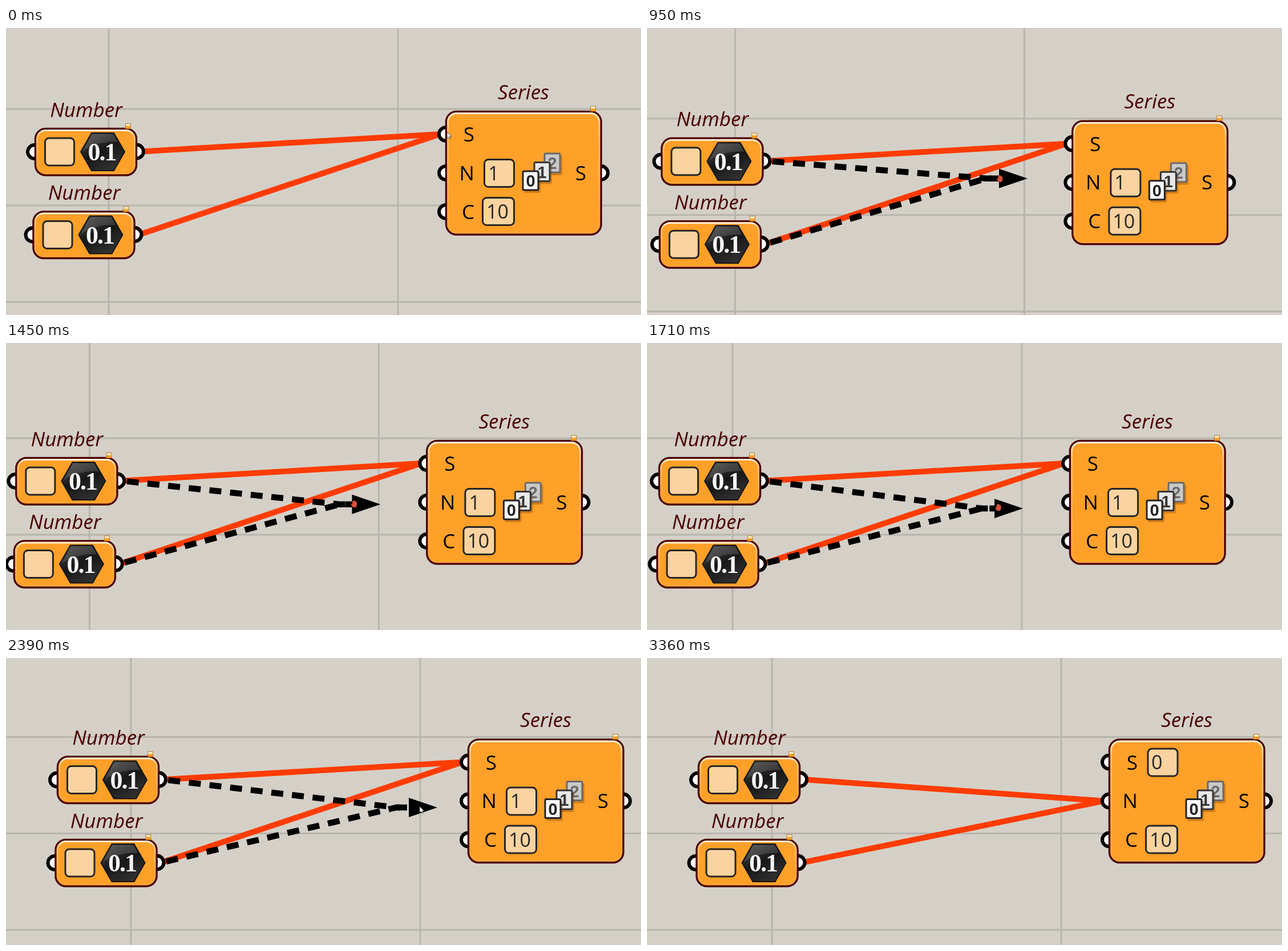
These frames come from a looping animation (1113 by 503 pixels, 4.23 s). An HTML page:

```html
<!DOCTYPE html>
<html lang="en">
<head>
<meta charset="utf-8">
<title>Moving wires between inputs</title>
<style>
  html, body { margin: 0; width: 100%; height: 100%; overflow: hidden; background: #d4d0c8; }
  svg { display: block; width: 1113px; height: 503px; }
  text { font-family: "Open Sans", "Noto Sans", sans-serif; font-size: 35px; }
  .title { font-style: italic; fill: #4b0000; text-anchor: middle; }
  .port { text-anchor: end; }
  .value { font-size: 34px; fill: #262626; }
  .field { fill: #fbd3a0; stroke: #262626; stroke-width: 3; }
  .body { fill: #ffa028; stroke: #4b0000; stroke-width: 3.5; }
  .rim { fill: none; stroke: url(#rim); stroke-width: 3; }
  .grip { fill: #fff; stroke: #000; stroke-width: 6; }
  .wire { fill: none; stroke: #ff3c00; stroke-width: 10; }
  .dash { fill: none; stroke: #000; stroke-width: 10.5; stroke-dasharray: 21 15.4; stroke-dashoffset: 20; }
  .decimal { font: bold 44px "Liberation Serif", serif; letter-spacing: -2px; fill: #f4f4f4; text-anchor: middle; }
  .digit { font: bold 29px "Liberation Sans", sans-serif; text-anchor: middle; }
</style>
</head>
<body>
<svg id="stage" viewBox="0 0 1113 503"></svg>
<script>
const LOOP = 4230;
const RELEASE = 2870;
const stage = document.getElementById('stage');

// Time, pan x/y, arrow x/y, pointer x/y
const keys = [
  [70, 0, 0, 768, 187, 773, 182],
  [560, 0, 0, 645, 245, 650, 244],
  [670, 0, 0, 645, 245, 650, 244],
  [1090, -38.5, 25, 603, 273, 603, 274],
  [1700, -30, 25, 609, 290, 616, 288],
  [1980, 22.5, 2.5, 666, 267, 672, 266],
  [2120, 39, -3.5, 683, 262, 690, 260],
  [2250, 39, -3.5, 683, 262, 690, 260],
  [2390, 39, -3.5, 706, 262, 725, 260],
  [2670, 39, -3.5, 805, 251, 812, 248],
  [RELEASE, 39, -3.5, 805, 251, 812, 248],
  [3290, 39, -3.5, 805, 251, 812, 486]
];

const sources = [[229, 216.5], [225.5, 362]];
const inputs = { S: [771, 186], N: [771, 254] };

const grip = (x, y) => `<circle class="grip" cx="${x}" cy="${y}" r="12"/>`;
const field = (x, y, w) => `<rect class="field" x="${x}" y="${y}" width="${w}" height="48" rx="7"/>`;
const text = (cls, x, y, s) => `<text class="${cls}" x="${x}" y="${y}">${s}</text>`;

const capsule = (x, y, w, h) => `
  <rect class="body" x="${x}" y="${y}" width="${w}" height="${h}" rx="18"/>
  <rect class="rim" x="${x + 3}" y="${y + 3}" width="${w - 6}" height="${h - 6}" rx="15"/>`;

const tag = (x, y) => `
  <rect x="${x - 4.5}" y="${y - 4.5}" width="9" height="9" fill="url(#tag)" stroke="#b8761f"/>`;

const numberNode = (dx, dy) => `
  <g transform="translate(${dx} ${dy})">
    ${grip(50, 217)}${grip(229, 216.5)}
    ${capsule(51.5, 176.5, 177, 81.5)}
    ${text('title', 140.5, 155.5, 'Number')}${tag(214, 172)}
    ${field(68.5, 193, 51)}
    <path d="M131 217 150 184H189L208 217 189 250H150Z" fill="url(#hex)" stroke="#151515" stroke-width="2" stroke-linejoin="round"/>
    <path d="M134 216 151 186H188L196 200Q160 198 134 216Z" fill="#fff" opacity=".13"/>
    ${text('decimal', 168, 232, '0.1')}
  </g>`;

const card = (x, y, digit, fill, ink) => `
  <rect x="${x + 2}" y="${y + 3}" width="29" height="35" rx="3" fill="#7a3c00" opacity=".35"/>
  <rect x="${x}" y="${y}" width="27" height="33" rx="2" fill="${fill}" stroke="${ink}" stroke-width="3"/>
  <text class="digit" x="${x + 13.5}" y="${y + 27}" fill="${ink}">${digit}</text>`;

const seriesNode = `
  ${[186, 254, 322].map(y => grip(771, y)).join('')}${grip(1043, 254)}
  ${capsule(771.5, 146.5, 271.5, 215.5)}
  ${text('title', 907, 124.5, 'Series')}${tag(1029, 141.5)}
  ${text('port', 821, 199, 'S')}${text('port', 821, 266.5, 'N')}${text('port', 821, 334.5, 'C')}
  ${text('port', 1017, 266.5, 'S')}
  <g id="start">${field(839, 162.5, 52)}${text('value', 845, 198.5, '0')}</g>
  <g id="step">${field(838.5, 230.5, 52)}${text('value', 845, 266.5, '1')}</g>
  ${field(835.5, 297.5, 55)}${text('value', 842, 334, '10')}
  ${card(944, 220, 2, '#c9c9c9', '#696969')}
  ${card(926, 235.5, 1, '#e8e8e8', '#353535')}
  ${card(906, 251, 0, '#fafafa', '#222')}`;

let grid = '';
for (let x = -327; x < 1500; x += 507) grid += `M${x} -200V800`;
for (let y = -27; y < 700; y += 169) grid += `M-300 ${y}H1500`;

stage.innerHTML = `
  <defs>
    <linearGradient id="rim" x2="0" y2="1">
      <stop offset="0" stop-color="#fff0d8"/>
      <stop offset=".12" stop-color="#ffd39a" stop-opacity=".7"/>
      <stop offset="1" stop-color="#ffb04a" stop-opacity=".35"/>
    </linearGradient>
    <linearGradient id="tag" x2="0" y2="1">
      <stop offset=".3" stop-color="#fff1d8"/>
      <stop offset=".6" stop-color="#ff9d20"/>
    </linearGradient>
    <linearGradient id="hex" x2=".6" y2="1">
      <stop offset="0" stop-color="#4b4b4b"/>
      <stop offset=".55" stop-color="#171717"/>
      <stop offset="1" stop-color="#303030"/>
    </linearGradient>
  </defs>
  <g id="canvas">
    <path d="${grid}" fill="none" stroke="#b8b5ae" stroke-width="3"/>
    <path class="wire"/><path class="wire"/>
    ${numberNode(0, 0)}${numberNode(-3.5, 145.5)}${seriesNode}
  </g>
  <g id="drag">
    <path class="dash"/><path class="dash"/>
    <path id="head" d="M0 -17 50 0 0 17Z"/>
  </g>
  <path id="pointer" d="M0 0V11L2.6 8.8 4.3 12.4 6.2 11.5 4.6 8H8Z" fill="#fff" stroke="#222" stroke-width=".8"/>
  <path id="hand" d="M-2.5 6-6 1-4.5 0-3.5 1V-4.5H-1.5V-6H.5V-5H2.5V-3.5H4.5V2L3 6Z" fill="#d9543f" stroke="#7b2a20" stroke-width=".8"/>`;

const el = id => document.getElementById(id);
const wires = stage.querySelectorAll('.wire');
const dashes = stage.querySelectorAll('.dash');
const show = (id, on) => el(id).setAttribute('visibility', on ? 'visible' : 'hidden');
const move = (id, x, y) => el(id).setAttribute('transform', `translate(${x} ${y})`);

// A straight run with a short level lead at each end
const link = ([x1, y1], [x2, y2], lead) =>
  `M${x1} ${y1}h8L${x2 - lead} ${y2}H${x2}`;

// The picture advances in steps of 70 ms within each gesture
function stepTime(t) {
  const origin = [2870, 2250, 1700, 600, 0].find(o => t >= o);
  return origin + Math.floor((t - origin) / 70) * 70;
}

function poseAt(t) {
  const i = keys.findIndex(k => k[0] > t);
  if (i === 0) return keys[0].slice(1);
  if (i < 0) return keys[keys.length - 1].slice(1);
  const a = keys[i - 1], b = keys[i];
  const u = (t - a[0]) / (b[0] - a[0]);
  return a.slice(1).map((v, n) => v + (b[n + 1] - v) * u);
}

function draw(time) {
  const t = stepTime(time);
  const [panX, panY, arrowX, arrowY, pointerX, pointerY] = poseAt(t);
  const released = t >= RELEASE;
  const panning = t > 670 && t < 2120;

  move('canvas', panX, panY);
  move('head', arrowX, arrowY);
  move('pointer', pointerX, pointerY);
  move('hand', pointerX, pointerY);

  sources.forEach(([x, y], i) => {
    wires[i].setAttribute('d', link([x, y], released ? inputs.N : inputs.S, 10));
    dashes[i].setAttribute('d', link([x + panX, y + panY], [arrowX + 1, arrowY], 23));
  });

  show('drag', t >= 70 && !released);
  show('start', released);
  show('step', !released);
  show('hand', panning);
  show('pointer', !panning && t < 3360);
}

function tick() {
  draw(performance.now() % LOOP);
  requestAnimationFrame(tick);
}
tick();
</script>
</body>
</html>
```
